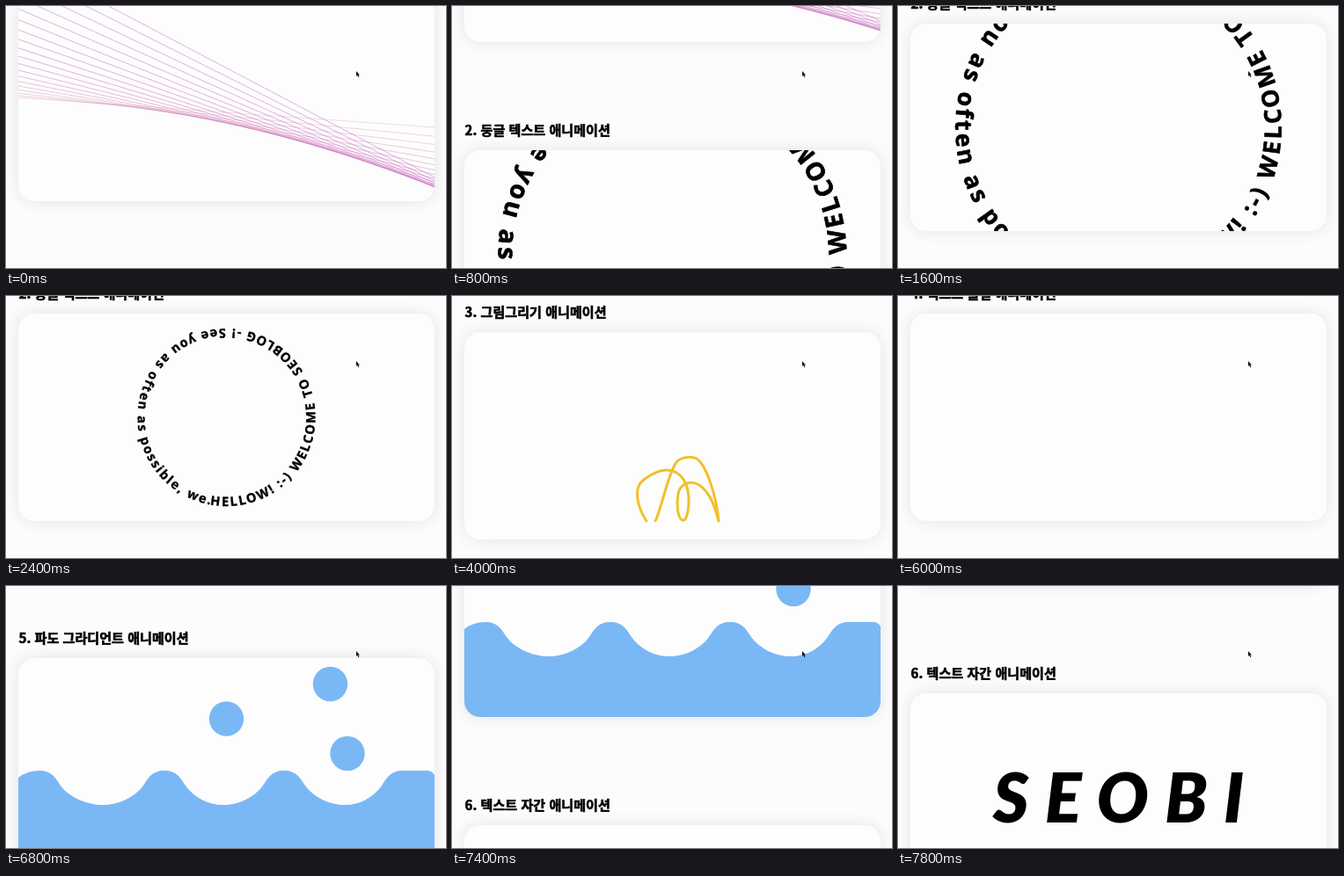
An HTML page that plays this animation: 500x298 px, repeating every 8000 ms.

```html
<!DOCTYPE html>
<html lang="ko">
<head>
<meta charset="utf-8">
<style>
  html, body { margin: 0; width: 100%; height: 100%; overflow: hidden; background: #fcfcfc; }
  #stage { position: relative; width: 100%; height: 100%; overflow: hidden; }
  #page { position: absolute; left: 14px; top: 0; width: 473px; }
  .card {
    position: absolute; width: 473px; height: 236px; border-radius: 18px;
    overflow: hidden; background: #fdfdfd; box-shadow: 0 0 18px rgba(0, 0, 0, .1);
  }
  h2 {
    position: absolute; margin: 0; left: .5px; white-space: nowrap;
    font: 900 15.1px/24px "Noto Sans CJK KR", "Noto Sans CJK", sans-serif;
    color: #000; -webkit-text-stroke: .6px #000;
  }
  svg { display: block; }
  #ringText { font: 700 14.5px "Open Sans", sans-serif; letter-spacing: 1.97px; stroke: #000; stroke-width: .35px; }
  #name { font: italic 900 77.5px Lato, sans-serif; text-anchor: middle; }
  #cursor { position: absolute; left: 397px; top: 73px; }
</style>
</head>
<body>
<div id="stage">
  <div id="page"></div>
  <svg id="cursor" width="7" height="10"><path d="M1 1V7L2.4 5.8 3.4 8.2 4.4 7.7 3.4 5.4H5Z" fill="#111"/></svg>
</div>
<script>
const LOOP = 8000, STEP = 200, PITCH = 359;

// Water outline: from one crest down into a trough and up to the next crest.
const trough = (from, mid, to) =>
  `C${from + 14} 128 ${from + 18} 136 ${from + 24} 145 C${from + 34} 159 ${mid - 17} 167 ${mid} 167` +
  `C${mid + 17} 167 ${to - 34} 159 ${to - 24} 145 C${to - 18} 136 ${to - 14} 128 ${to} 128`;
const water = 'M0 236V136Q10 128 24 128' + trough(24, 96, 166) + trough(166, 233, 302) +
  trough(302, 371, 437) + 'H466Q471 129 473 133V236Z';

const giraffe = `M207 215C200 205 195 190 197 179C198 167 222 156 231 157
  C248 158 256 175 255 195C254 210 251 215 248 214C242 212 241 195 243 184
  C245 173 256 168 267 174C280 183 285 200 289 215C287 190 276 152 264 144
  C258 141 246 142 241 148C232 160 227 190 218 213Q216 217 214 211
  C215 180 214 150 208 135C202 122 192 108 184 88C176 70 172 58 166 52
  C158 58 146 68 141 64C138 58 152 46 160 36C162 30 160 22 164 22
  C168 24 166 34 170 38C178 50 186 78 203 100C215 112 232 117 248 121
  C268 126 282 138 288 156C294 174 304 189 315 189`;

const halfTurns = 'A101 101 0 0 0 0 -101A101 101 0 0 0 0 101'.repeat(2);

const sections = [
  ['', '<g id="lines"></g>'],
  ['2. 둥글 텍스트 애니메이션',
    `<path id="circle" d="M0 101${halfTurns}" fill="none"/>
     <g id="ring"><text id="ringText"><textPath href="#circle">HELLOW! :-) WELCOME TO SEOBLOG -! See you as often as possible, we.</textPath></text></g>`],
  ['3. 그림그리기 애니메이션',
    `<path id="drawing" d="${giraffe}" pathLength="1" fill="none" stroke="#f2c02c" stroke-width="3" stroke-linecap="round" stroke-linejoin="round"/>`],
  ['4. 텍스트 물결 애니메이션', ''],
  ['5. 파도 그라디언트 애니메이션',
    `<g fill="#7ab8f5"><path d="${water}"/><g id="bubbles">
     <circle cx="236.5" cy="69" r="19.7"/><circle cx="354.5" cy="29.5" r="19.7"/><circle cx="374" cy="108.5" r="19.7"/></g></g>`],
  ['6. 텍스트 자간 애니메이션', '<text id="name" y="147">SEOBI</text>'],
];

const el = id => document.getElementById(id);
el('page').innerHTML = sections.map(([title, art], i) =>
  `<h2 style="top:${i * PITCH - 36}px">${title}</h2>
   <div class="card" style="top:${i * PITCH}px"><svg width="473" height="236">${art}</svg></div>`).join('');

const LINES = 19;
el('lines').innerHTML = Array.from({ length: LINES }, (_, k) => {
  const u = k / (LINES - 1);
  return `<line x1="0" x2="473" stroke="hsl(${340 - 40 * Math.sqrt(u)} 45% 60%)" stroke-width=".7" opacity="${.35 + .4 * Math.min(1, u * 2)}"/>`;
}).join('');

// [time, scroll position]
const scrollStops = [[0, 14], [800, 195], [1200, 295], [1400, 328], [1600, 339], [2500, 339],
  [3000, 520], [3400, 665], [3600, 677], [4800, 677], [5000, 806], [5400, 1030], [5600, 1057],
  [6200, 1057], [6400, 1130], [6800, 1354], [7000, 1416], [7200, 1416], [7600, 1630], [7800, 1673], [8000, 1673]];

function scrollAt(t) {
  const i = scrollStops.findIndex(([time]) => time > t);
  const [t0, y0] = scrollStops[i - 1], [t1, y1] = scrollStops[i];
  return y0 + (y1 - y0) * (t - t0) / (t1 - t0);
}

function drawLines(s) {
  [...el('lines').children].forEach((line, k) => {
    const u = k / (LINES - 1);
    line.setAttribute('y1', 118 - 30 * u - 128 * u * u + 50 * s);
    line.setAttribute('y2', 152 + 190.7 * u - 133.7 * u * u + 4 * s);
  });
}

function render(t) {
  const s = t / 1000;
  el('page').style.transform = `translateY(${-scrollAt(t)}px)`;
  drawLines(s);

  const scale = 1.585 + .585 * Math.cos(2 * Math.PI * (s - 1.15) / 2.5);
  const angle = 10.6 + 24 * (s - 2.4);
  el('ring').setAttribute('transform', `translate(236.5 118) rotate(${angle}) scale(${scale})`);

  const drawn = Math.min(1, Math.max(0, (t - 3115) / 1885));
  el('drawing').setAttribute('stroke-dasharray', `${drawn} 2`);
  el('drawing').setAttribute('visibility', drawn ? 'visible' : 'hidden');

  el('bubbles').setAttribute('transform', `translate(0 ${(6.8 - s) * 30})`);

  const spacing = 18.5 + 25 * (s - 7.8);
  el('name').style.letterSpacing = spacing + 'px';
  el('name').setAttribute('x', 236.5 + spacing / 2);
}

const start = performance.now();
function tick() {
  const t = (performance.now() - start) % LOOP;
  render(Math.floor(t / STEP) * STEP);
  requestAnimationFrame(tick);
}
tick();
</script>
</body>
</html>
```
